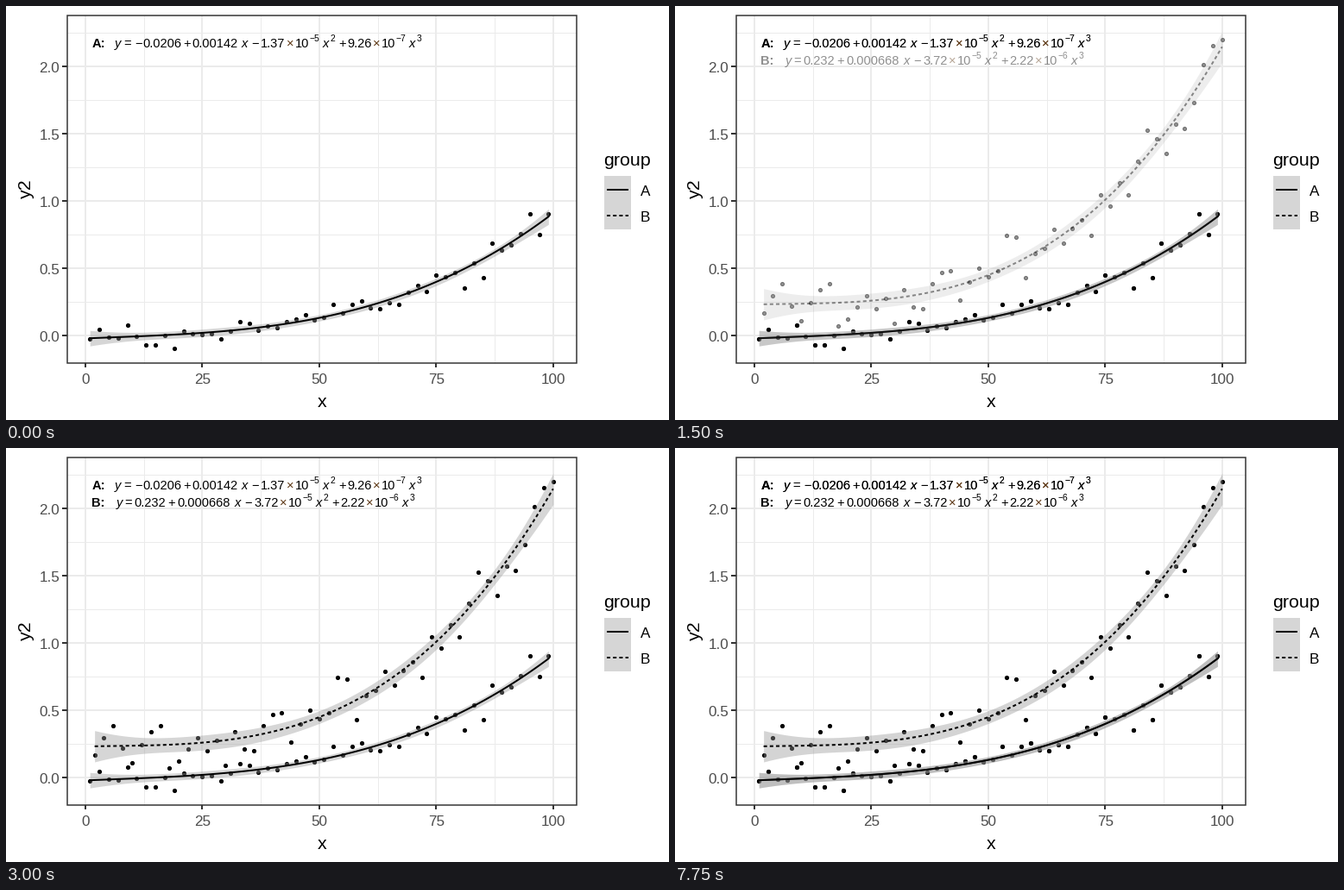
Write a matplotlib script that moves like this. It is 768x480 px and loops after 8 s.

```python
import numpy as np
import matplotlib.pyplot as plt
from matplotlib.animation import FuncAnimation
from matplotlib.patches import Rectangle

W, H, DPI = 768, 480, 96
PX = 72 / DPI  # points per pixel
X0, SX = 91.8, 5.42
Y0, SY = 382.2, 156
LEFT, RIGHT, TOP, BOTTOM = 70.5, 660.5, 10.7, 413.5
KEY = 30.7

plt.rcParams["font.family"] = "Liberation Sans"

# Observations in thousandths: group A at odd x, group B at even x
OBS_A = [-24, 43, -12, -21, 78, -2, -72, -72, 1, -92,
         33, 11, 8, 17, -24, 33, 101, 88, 37, 69,
         56, 101, 123, 158, 117, 139, 229, 168, 235, 258,
         206, 203, 248, 235, 319, 376, 331, 447, 440, 469,
         351, 537, 428, 690, 639, 674, 758, 908, 754, 905]
OBS_B = [171, 299, 389, 222, 113, 242, 338, 389, 69, 126,
         216, 293, 203, 274, 88, 338, 216, 197, 389, 472,
         479, 267, 396, 504, 434, 485, 742, 735, 428, 613,
         646, 787, 690, 793, 863, 748, 1049, 960, 1139, 1049,
         1299, 1530, 1460, 1351, 1569, 1537, 1735, 2011, 2158, 2197]
COEF_A = [-0.0206, 0.00142, -1.37e-5, 9.26e-7]
COEF_B = [0.232, 0.000668, -3.72e-5, 2.22e-6]

fig = plt.figure(figsize=(W / DPI, H / DPI), dpi=DPI, facecolor="white")
ax = fig.add_axes([0, 0, 1, 1])
ax.set_xlim(0, W)
ax.set_ylim(H, 0)
ax.axis("off")


def px(x):
    return X0 + SX * np.asarray(x)


def py(y):
    return Y0 - SY * np.asarray(y)


def write(x, y, text, size, color="black", **kw):
    return ax.text(x, y, text, fontsize=size * PX, color=color,
                   va="baseline", **kw)


def rule(x, y, color, width, z=0):
    ax.plot(x, y, color=color, lw=width * PX, zorder=z,
            solid_capstyle="butt")


def draw_frame():
    for v in (12.5, 37.5, 62.5, 87.5):
        rule([px(v)] * 2, [TOP, BOTTOM], "#EBEBEB", 1)
    for v in (0.25, 0.75, 1.25, 1.75, 2.25):
        rule([LEFT, RIGHT], [py(v)] * 2, "#EBEBEB", 1)
    for v in (0, 25, 50, 75, 100):
        rule([px(v)] * 2, [TOP, BOTTOM], "#EBEBEB", 2, 0.5)
        rule([px(v)] * 2, [BOTTOM, BOTTOM + 5.3], "#333333", 2, 8)
        write(px(v), 438, str(v), 17.07, "#4D4D4D", ha="center")
    for v in (0, 0.5, 1, 1.5, 2):
        rule([LEFT, RIGHT], [py(v)] * 2, "#EBEBEB", 2, 0.5)
        rule([LEFT - 5.3, LEFT], [py(v)] * 2, "#333333", 2, 8)
        write(62, py(v) + 6.6, f"{v:.1f}", 17.07, "#4D4D4D", ha="right")
    ax.add_patch(Rectangle((LEFT, TOP), RIGHT - LEFT, BOTTOM - TOP,
                           fill=False, ec="#333333", lw=1.5 * PX, zorder=9))
    write(366, 465, "x", 21.33, ha="center")
    write(28.5, 212, "y2", 21.33, ha="center", rotation=90,
          rotation_mode="anchor")


def draw_legend():
    write(692.5, 185, "group", 21.33)
    ax.add_patch(Rectangle((693, 197.2), KEY, 2 * KEY, fc="#D6D6D6", lw=0))
    for i, name in enumerate("AB"):
        y = 197.2 + KEY * (i + 0.5)
        style = "-" if i == 0 else (0, (2, 1.6))
        ax.plot([696, 721], [y, y], color="black", lw=2 * PX, ls=style,
                solid_capstyle="butt", dash_capstyle="butt")
        write(735, y + 7.2, name, 17.07)


def fit_band(x, obs, coef):
    """Cubic curve with its 95 % confidence half-width."""
    basis = np.vander(x / 100, 4, increasing=True)
    resid = obs - np.polynomial.polynomial.polyval(x, coef)
    sigma = np.sqrt(resid @ resid / (len(x) - 4))
    inv = np.linalg.inv(basis.T @ basis)
    grid = np.linspace(x[0], x[-1], 80)
    g = np.vander(grid / 100, 4, increasing=True)
    half = 2.013 * sigma * np.sqrt(np.sum((g @ inv) * g, axis=1))
    return grid, np.polynomial.polynomial.polyval(grid, coef), half


def equation(name, base, head, shift, factors):
    """Label, opening terms, then the square and cubic terms."""
    size, small, up = 14.67, 10.3, base - 7
    (m2, e2), (m3, e3) = factors
    out = [write(99.5, base, name + ":", size, weight="bold")]
    for x, s in head:
        out.append(write(x, base, s, size,
                         style="italic" if s == "y" else "normal"))
    for x, s in ((284, "\u2212"), (295, m2), (335, "10"),
                 (385, "+"), (395, m3), (435, "10")):
        out.append(write(x + shift, base, s, size))
    for x in (324.7, 424.7):
        out.append(write(x + shift, base, "\u00d7", size, "#5A3410"))
    for x in (273, 367, 467):
        out.append(write(x + shift, base, "x", size, style="italic"))
    for x, s in ((351, "\u2212" + e2), (376, "2"),
                 (451, "\u2212" + e3), (476, "3")):
        out.append(write(x + shift, up, s, small))
    return out


EQ_A = ("A", 48, [(126, "y"), (136, "="), (149, "\u2212"), (158.5, "0.0206"),
                  (205, "+"), (215.5, "0.00142")],
        0, (("1.37", "5"), ("9.26", "7")))
EQ_B = ("B", 68, [(128, "y"), (137, "="), (148.5, "0.232"), (187.5, "+"),
                  (198.5, "0.000668")],
        -8, (("3.72", "5"), ("2.22", "6")))


class Layer:
    """One copy of a group: points, band, curve and equation."""

    def __init__(self, first, obs, coef, eq, style, z):
        x = np.arange(first, 101, 2, dtype=float)
        y = np.array(obs) / 1000
        grid, mid, half = fit_band(x, y, coef)
        dots, = ax.plot(px(x), py(y), "o", color="black", ms=4.2 * PX,
                        mew=0.94 * PX, zorder=2 + z)
        self.band = ax.fill_between(px(grid), py(mid - half), py(mid + half),
                                    color="#999999", lw=0, zorder=4 + z)
        line, = ax.plot(px(grid), py(mid), color="black", lw=2 * PX, ls=style,
                        dash_capstyle="butt", zorder=4.05 + z)
        self.solid = [dots, line] + equation(*eq)

    def fade(self, alpha):
        for art in self.solid:
            art.set_alpha(alpha)
            art.set_visible(alpha > 0)
        self.band.set_alpha(0.4 * alpha)
        self.band.set_visible(alpha > 0)


def layer_a(z):
    return Layer(1, OBS_A, COEF_A, EQ_A, "-", z)


def layer_b(z):
    return Layer(2, OBS_B, COEF_B, EQ_B, (0, (2, 1.6)), z)


draw_frame()
draw_legend()
layers = [layer_a(0), layer_b(0.1), layer_a(0.2), layer_b(0.3)]


def alphas(k):
    """Opacity of kept A, kept B, live A, live B."""
    if k < 5:
        return 0, 0, 1, 0
    if k < 30:
        t = (k - 4) / 25
        return 1, 0, 1 - t, t
    if k < 56:
        return 1, 0, 0, 1
    t = (k - 54) / 25
    return 1, 1, t, 1 - t


def update(k):
    for layer, a in zip(layers, alphas(k)):
        layer.fade(a)
    return []


anim = FuncAnimation(fig, update, frames=80, interval=100, repeat=True,
                     init_func=lambda: update(0))
plt.show()
```
